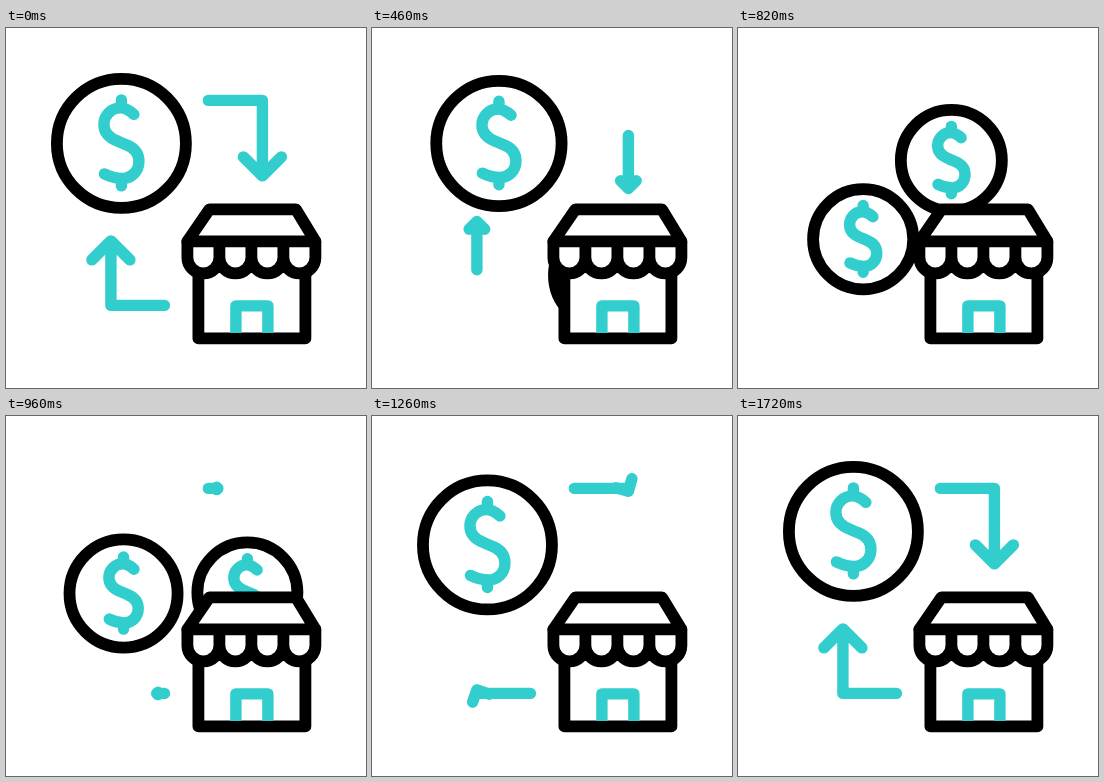
Recreate the animation shown at these times as an HTML page. Size 360 px wide and 360 px high, loop 1.8 s.

```html
<!DOCTYPE html>
<html lang="en">
<head>
<meta charset="utf-8">
<title>Coin and shop cycle</title>
<style>
  html, body { margin: 0; width: 100%; height: 100%; overflow: hidden; background: #fff; }
  svg { display: block; width: 100%; height: 100%; }
  path, circle { stroke-linecap: round; stroke-linejoin: round; }
  .ink { stroke: #000; stroke-width: 11.8; fill: #fff; }
  .teal { stroke: #32cdcd; stroke-width: 11.4; fill: none; }
</style>
</head>
<body>
<svg viewBox="0 0 360 360">
  <g transform="translate(.4 .4)">
    <path id="right" class="teal"/>
    <path id="left" class="teal"/>
    <g id="coins"></g>
    <path class="ink" d="M192 238V310H299V238"/>
    <path class="teal" style="stroke-linecap:butt" d="M229.5 304.5V277.5H261.5V304.5"/>
    <path id="awning" class="ink"/>
    <path class="ink" d="M181 213L203 181H289.5L309 213Z"/>
  </g>
</svg>
<script>
const LOOP = 1800;
const INK = 11.8, TEAL = 11.4;
const HOME = 115, SHOP = 247;
const BIG = 70.4, SMALL = 55.9;
const $ = id => document.getElementById(id);

const mix = (a, b, k) => a + (b - a) * k;
const ramp = (t, a, b) => Math.min(1, Math.max(0, (t - a) / (b - a)));
const smooth = u => u * u * (3 - 2 * u);
const ease = (t, a, b) => smooth(ramp(t, a, b));

function cubic(p0, p1, p2, p3, k) {
  const m = 1 - k;
  return p0 * m ** 3 + 3 * p1 * k * m * m + 3 * p2 * k * k * m + p3 * k ** 3;
}

// Ease from rest to rest, with handles x1 and x2 on the time axis.
function swing(u, x1, x2) {
  let lo = 0, hi = 1;
  for (let i = 0; i < 24; i++) {
    const k = (lo + hi) / 2;
    if (cubic(0, x1, x2, 1, k) < u) lo = k; else hi = k;
  }
  return smooth(lo);
}

// Curve that leaves sideways and arrives vertically; bend is 0 to 1.
function curve(from, to, bend, k) {
  const reach = (to - from) * bend;
  return [
    cubic(from, from + reach, to, to, k),
    cubic(from, from, to - reach, to, k)
  ];
}

const DOLLAR = "M12.5-29C8-33 4-35.5-1-35.5C-10-35.5-17.5-28-17.5-19C-17.5-10-11-5-3-2"
  + "L4 1C12 4 17.5 9 17.5 18C17.5 28 10 35 1 35C-6 35-12 33-17 30.5"
  + "M0-43.5V-36M0 35V42.5";

function makeCoin() {
  const add = (parent, tag, kind) => {
    const el = document.createElementNS("http://www.w3.org/2000/svg", tag);
    if (kind) el.setAttribute("class", kind);
    return parent.appendChild(el);
  };
  const g = add($("coins"), "g");
  const ring = add(g, "circle", "ink");
  const sign = add(g, "path", "teal");
  sign.setAttribute("d", DOLLAR);
  return ([x, y], outer) => {
    const r = outer - INK / 2, k = r / (BIG - INK / 2);
    g.setAttribute("transform", `translate(${x} ${y})`);
    ring.setAttribute("r", r);
    sign.setAttribute("transform", `scale(${k})`);
    sign.style.strokeWidth = TEAL / k;
  };
}

// A bent arrow: `run` sideways, then up to `len` vertically; dir is 1 or -1.
function makeArrow(el, x, y, dir, run, len) {
  const END = 151, HEAD = 19, TURN = 12;
  const at = s => [x + dir * Math.min(s, run), y + dir * Math.max(0, s - run)];

  function show(tail, tip, head, width) {
    const [px, py] = at(tip);
    const turn = ease(tip, run - TURN, run + TURN) * Math.PI / 2;
    const wing = side => {
      const a = turn + side * Math.PI / 4, r = dir * head * Math.SQRT2;
      return [px - r * Math.cos(a), py - r * Math.sin(a)];
    };
    const line = [at(tail), at(Math.min(Math.max(run, tail), tip)), [px, py]];
    el.style.display = width > 0.1 ? "" : "none";
    el.style.strokeWidth = width;
    el.setAttribute("d", `M${line.join("L")}M${wing(-1)}L${px},${py}L${wing(1)}`);
  }

  return {
    shrink(e) {
      show(END * e, mix(len, END, e), HEAD * (1 - e), TEAL * Math.min(1, 20 * (1 - e)));
    },
    grow(reach, size) {
      const tip = len * reach;
      show(0, tip, HEAD * size, Math.min(TEAL, 3 * tip));
    }
  };
}

$("awning").setAttribute("d",
  [0, 1, 2, 3].map(i => `M${181 + 32 * i} 213V229a16 16 0 0 0 32 0V213`).join(""));

const outCoin = makeCoin(), inCoin = makeCoin();
const arrowR = makeArrow($("right"), 202, 72, 1, 54, 129.5);
const arrowL = makeArrow($("left"), 158, 277, -1, 53.5, 118);

function draw(t) {
  const into = swing(ramp(t, 230, 1400), 0.675, 0.41);
  const out = swing(ramp(t, 300, 1560), 0.4, 0.22);
  inCoin(curve(HOME, SHOP, 0.835, into), mix(BIG, SMALL, ease(t, 340, 880)));
  outCoin(curve(SHOP, HOME, 0.925, out), mix(SMALL, BIG, ease(t, 800, 1260)));

  if (t < 800) {
    const e = ease(t, 135, 715);
    arrowR.shrink(e);
    arrowL.shrink(e);
  } else {
    const e = ease(t, 820, 1720);
    arrowR.grow(ramp(t, 900, 1720), e);
    arrowL.grow(e, e);
  }
}

let start;
function tick(now) {
  if (start === undefined) start = now;
  draw((now - start) % LOOP);
  requestAnimationFrame(tick);
}
draw(0);
requestAnimationFrame(tick);
</script>
</body>
</html>
```
